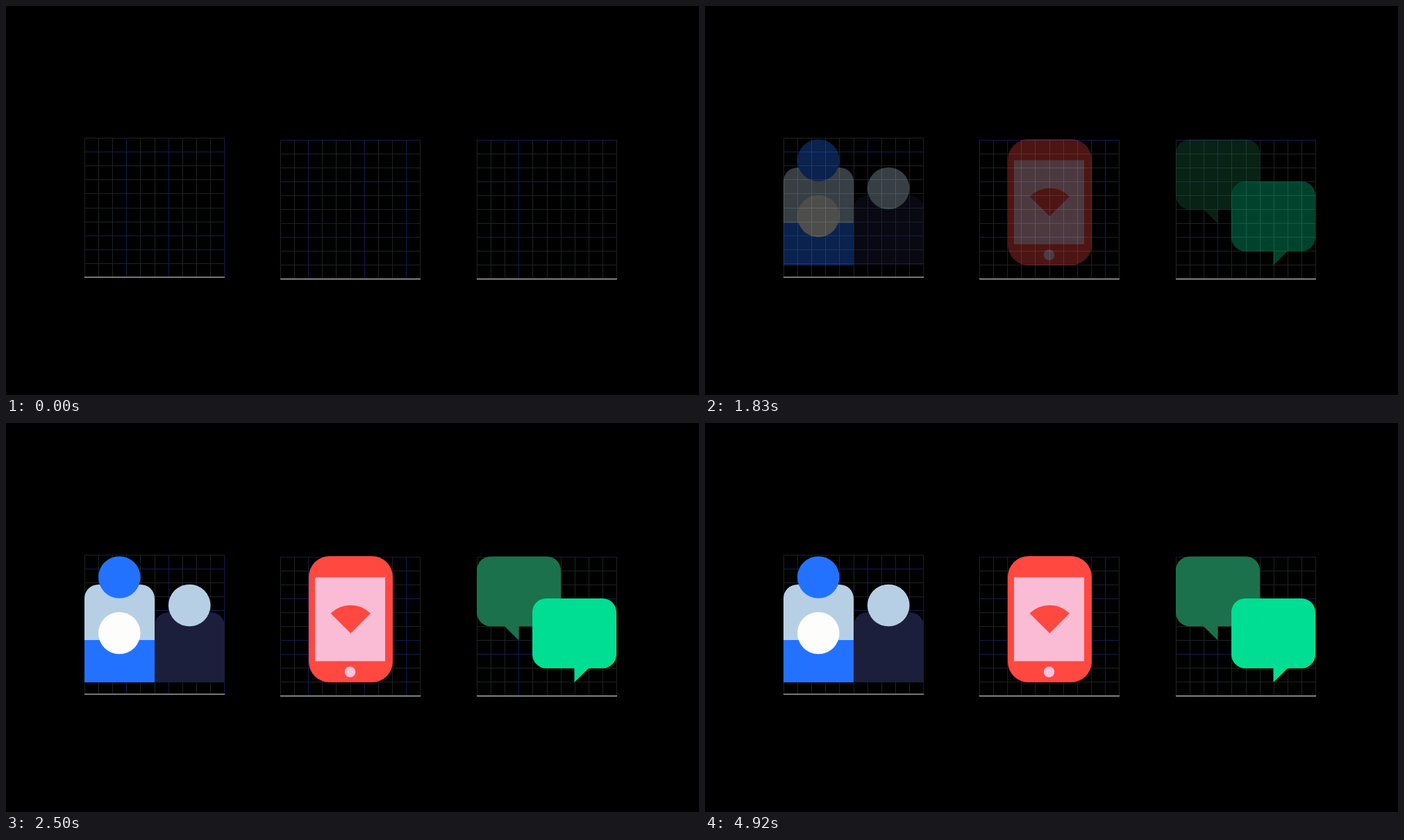
Write an HTML page that moves like this. It is 998x561 px and loops after 4.96 s.

```html
<!DOCTYPE html>
<html lang="en">
<head>
<meta charset="utf-8">
<title>Icon construction</title>
<style>
  html, body { margin: 0; width: 100%; height: 100%; overflow: hidden; background: #000; }
  svg { display: block; width: 100vw; height: 100vh; }
</style>
</head>
<body>
<svg viewBox="0 0 998 561">
  <rect width="998" height="561"/>
  <g id="grid" fill="none"></g>
  <g id="fills" opacity="0">
    <path fill="#b7cfe4" d="M113 374V253A20 20 0 0 1 133 233H194A20 20 0 0 1 214 253V374Z"/>
    <path fill="#2372ff" d="M113 313H214V374H113Z"/>
    <circle fill="#2372ff" cx="163.3" cy="222.5" r="30.3"/>
    <circle fill="#fdfdfb" cx="163.3" cy="303" r="30.3"/>
    <path fill="#1b1f3c" d="M214 374V293A20 20 0 0 1 234 273H295A20 20 0 0 1 315 293V374Z"/>
    <circle fill="#b7cfe4" cx="264.2" cy="263" r="30.3"/>
    <rect fill="#ff4840" x="436" y="192" width="121" height="182" rx="30"/>
    <rect fill="#fabcd4" x="445" y="222.5" width="101" height="121"/>
    <path fill="#ff4840" d="M467.5 274.5A41 41 0 0 1 525 274.5L496.3 303.3Z"/>
    <circle fill="#fac3dc" cx="495.5" cy="359" r="7.8"/>
    <path fill="#1b714b" d="M698 192.5H779A20 20 0 0 1 799 212.5V273A20 20 0 0 1 779 293.3H738.5V313.5L718 293.3H698A20 20 0 0 1 678 273V212.5A20 20 0 0 1 698 192.5Z"/>
    <path fill="#00de93" d="M778 253H859A20 20 0 0 1 879 273V333.5A20 20 0 0 1 859 353.7H839L818.5 374V353.7H778A20 20 0 0 1 758 333.5V273A20 20 0 0 1 778 253Z"/>
  </g>
  <g id="lines" fill="none" stroke="#e8e8e4" stroke-width="1"></g>
</svg>
<script>
const LOOP = 4960;
const $ = id => document.getElementById(id);

function add(parent, d, attrs = {}) {
  const p = document.createElementNS('http://www.w3.org/2000/svg', 'path');
  p.setAttribute('d', d);
  for (const k in attrs) p.setAttribute(k, attrs[k]);
  parent.appendChild(p);
  return p;
}

// Each panel: left, top, indices of the blue columns and rows.
const panels = [
  [113.5, 190.5, [3, 6, 10], [1, 4, 7, 8]],
  [395.5, 193, [2, 6, 9], [0, 3, 6, 7]],
  [678.5, 193, [3], [0, 3, 7]]
];
const SIZE = 201, CELL = SIZE / 10;
const tint = blue => ({ stroke: blue ? '#141b52' : '#1f2323' });

for (const [x, y, cols, rows] of panels) {
  for (let i = 0; i <= 10; i++) {
    const px = Math.floor(x + i * CELL) + 0.5, py = Math.floor(y + i * CELL) + 0.5;
    add($('grid'), `M${px} ${y}v${SIZE}`, tint(cols.includes(i)));
    add($('grid'), `M${x} ${py}h${SIZE}`, tint(rows.includes(i)));
  }
  add($('grid'), `M${x - 0.5} ${y + SIZE - 0.3}h${SIZE + 1}`, { stroke: '#b4b4b0', 'stroke-width': 1.2 });
}

const ring = (x, y, r) =>
  `M${x} ${y - r}A${r} ${r} 0 0 1 ${x} ${y + r}A${r} ${r} 0 0 1 ${x} ${y - r}`;

// Outline, start and end of its drawing in ms.
const outlines = [
  ['M193 232.5A20.5 20.5 0 0 1 213.5 253V373.5H112.5V253A20.5 20.5 0 0 1 133 232.5', 0, 1370],
  ['M112.5 313.5H134', 300, 800],
  ['M193 313.5H213', 700, 1239],
  ['M235 272.8A20.5 20.5 0 0 0 213.3 293V373.5H314V293A20.5 20.5 0 0 0 293.5 272.8', 200, 1533],
  [ring(163.7, 223, 30.5), 0, 1000],
  [ring(163.7, 303.5, 30.5), 0, 1000],
  [ring(264.2, 263.3, 30.5), 0, 1000],
  ['M556.5 222V344A30 30 0 0 1 526.5 374H465.5A30 30 0 0 1 435.5 344V222A30 30 0 0 1 465.5 192H526.5A30 30 0 0 1 556.5 222', 0, 1417],
  ['M545 222.5V343.5H445V222.5H545', 0, 1154],
  ['M467 274.3A41 41 0 0 1 524 274.3L495.7 302.3Z', 0, 1000],
  [ring(494.8, 358, 7.5), 0, 1000],
  ['M798.5 213V273.3A20 20 0 0 1 778.5 293.3H739V313.5L719 293.3H699A20 20 0 0 1 679 273.3V212.8A20 20 0 0 1 699 192.8H778.5A20 20 0 0 1 798.5 213', 0, 1302],
  ['M758 274V333.7A20 20 0 0 0 778 353.7H818V374L838 353.7H858A20 20 0 0 0 878 333.7V273.3A20 20 0 0 0 858 253.3H778A20 20 0 0 0 758 274', 0, 1463]
].map(([d, start, end]) => {
  const path = add($('lines'), d);
  return { path, start, end, length: path.getTotalLength() };
});

const ramp = (t, a, b) => Math.min(1, Math.max(0, (t - a) / (b - a)));
const ease = u => (1 - Math.cos(Math.PI * u)) / 2;

function draw(t) {
  for (const { path, start, end, length } of outlines) {
    const u = ease(ramp(t, start, end));
    path.setAttribute('visibility', u > 0 ? 'visible' : 'hidden');
    path.setAttribute('stroke-dasharray', u < 1 ? `${u * length} ${length + 2}` : 'none');
  }
  $('lines').setAttribute('opacity', 1 - ramp(t, 1580, 1790));
  $('fills').setAttribute('opacity', ramp(t, 1620, 2320));
}

const began = performance.now();
function tick() {
  draw((performance.now() - began) % LOOP);
  requestAnimationFrame(tick);
}
draw(0);
requestAnimationFrame(tick);
</script>
</body>
</html>
```
